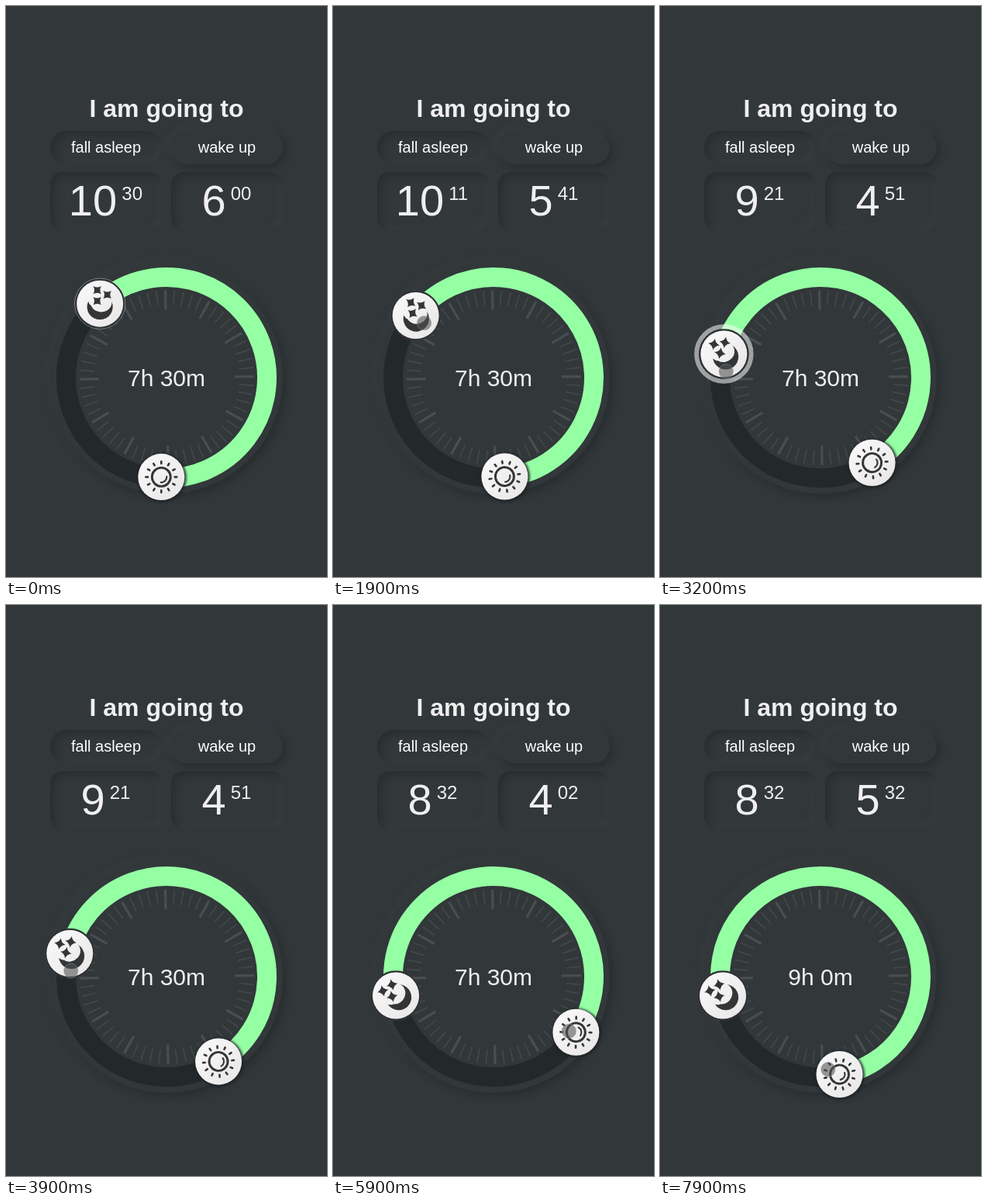
Recreate the animation shown at these times as an HTML page. Size 414 by 736 pixels, loop 8000 ms.

```html
<!DOCTYPE html>
<html lang="en">
<head>
<meta charset="utf-8">
<title>Sleep timer</title>
<style>
html, body { margin: 0; width: 100%; height: 100%; overflow: hidden; background: #32373a; }
#stage {
  position: relative; width: 414px; height: 736px; overflow: hidden;
  background: #32373a;
  font-family: "Liberation Sans", Arial, sans-serif;
}
.box { position: absolute; width: 144px; }
.left { left: 57px; }
.right { left: 213px; }
.button { top: 161px; height: 43px; border-radius: 21px; }
.time { top: 214px; height: 75px; border-radius: 16px; }
.inset { box-shadow: inset 5px 5px 9px #292e31, inset -5px -5px 9px #373c3f; }
.raised { box-shadow: 4px 4px 8px #282d30, -4px -4px 8px #383d40; }
.bezel {
  position: absolute; left: 57px; top: 329px; width: 300px; height: 300px;
  border-radius: 50%; box-shadow: 5px 5px 10px #292e31, -4px -4px 9px #373c3f;
}
svg { position: absolute; left: 0; top: 0; }
text { fill: #efefef; text-anchor: middle; }
.title { font-size: 32px; font-weight: bold; }
.label { font-size: 20px; fill: #fff; }
.hour { font-size: 56px; text-anchor: start; }
.minute { font-size: 24px; text-anchor: start; }
.total { font-size: 30px; }
.ink { fill: #333537; }
.line { fill: none; stroke: #333537; stroke-linecap: round; }
</style>
</head>
<body>
<div id="stage">
  <div class="box button left inset"></div>
  <div class="box button right raised"></div>
  <div class="box time left inset"></div>
  <div class="box time right inset"></div>
  <div class="bezel"></div>
  <svg width="414" height="736" viewBox="0 0 414 736">
    <defs>
      <linearGradient id="face" x1="0" y1="0" x2="1" y2="1">
        <stop offset="0" stop-color="#fbfafa"/>
        <stop offset="1" stop-color="#e7e5e5"/>
      </linearGradient>
      <filter id="shade" x="-30%" y="-30%" width="160%" height="160%">
        <feGaussianBlur stdDeviation="1.5"/>
      </filter>
    </defs>
    <text class="title" x="207" y="143">I am going to</text>
    <text class="label" x="129" y="189">fall asleep</text>
    <text class="label" x="285" y="189">wake up</text>
    <text class="hour" id="sleepHour" y="270"></text>
    <text class="minute" id="sleepMinute" y="250"></text>
    <text class="hour" id="wakeHour" y="270"></text>
    <text class="minute" id="wakeMinute" y="250"></text>

    <circle cx="207" cy="479" r="129.5" fill="none" stroke="#23282b" stroke-width="25"/>
    <g id="ticks" transform="translate(207.3 479.3) rotate(-0.9)"></g>
    <path id="arc" fill="none" stroke-width="25"/>
    <text class="total" id="total" x="207" y="490"></text>

    <g id="sun">
      <circle cx=".8" cy=".8" r="31.8" fill="#1c2022" opacity=".85" filter="url(#shade)"/>
      <circle r="30" fill="url(#face)"/>
      <g id="sunIcon">
        <circle class="line" r="12" stroke-width="2.9"/>
        <path class="line" d="M7 -.5A7 7 0 0 1 -.5 7" stroke-width="2.1"/>
      </g>
    </g>
    <g id="moon">
      <circle id="pulse" fill="none" stroke="#fff"/>
      <circle r="31" fill="none" stroke="#2d3133" stroke-width="2.4"/>
      <circle r="30" fill="url(#face)"/>
      <g id="moonIcon">
        <path class="ink" d="M-15 -3A16.6 16.6 0 1 0 15 -3A13.5 12 0 0 1 -11 3Q-14 1 -15 -3Z"/>
      </g>
    </g>
    <circle id="cursor" r="9.3" fill="#505152" fill-opacity=".58" stroke="#aaa" stroke-opacity=".4"/>
  </svg>
</div>
<script>
const LOOP = 8000, CX = 207, CY = 479, KNOB_R = 128.3, ARC_R = 129.5, CYCLE = 90;
const $ = id => document.getElementById(id);

const clamp = x => Math.min(1, Math.max(0, x));
const mix = (a, b, p) => a + (b - a) * p;
const ramp = (t, t0, t1) => clamp((t - t0) / (t1 - t0));
const glide = (t, t0, t1) => .5 - .5 * Math.cos(Math.PI * ramp(t, t0, t1));

// Times of day in minutes on a twelve-hour dial
const sleepAt = t => 630 - 160 * glide(t, 1700, 2600)
  + 132 * glide(t, 2700, 3500) - 90 * glide(t, 3500, 4350);
const wakeAt = t => sleepAt(t) - 270 - 47 * glide(t, 5900, 6400)
  + 47 * glide(t, 6400, 6720) + 90 * glide(t, 7050, 7600);
const spanAt = t => Math.round(wakeAt(t)) + 720 - Math.round(sleepAt(t));
const dialAngle = minutes => minutes / 2 + 3;

// Share of the last 300 ms spent away from a whole sleep cycle
function warnAt(t) {
  const steps = 30;
  let off = 0;
  for (let i = 0; i < steps; i++) {
    const span = spanAt(t - i * 300 / steps);
    if (Math.abs(span - CYCLE * Math.round(span / CYCLE)) > 3) off++;
  }
  return off / steps;
}

function polar(deg, r) {
  const a = deg * Math.PI / 180;
  return [CX + r * Math.sin(a), CY - r * Math.cos(a)];
}

// The pointer drags the moon, swings across the dial, then drags the sun
function cursorAt(t) {
  const moonLag = 1.3 - 11.3 * glide(t, 1700, 2500);
  const moonR = 46 + 67.5 * glide(t, 800, 1150) + 10 * glide(t, 1700, 3700);
  const sunLead = 1.8 + 4.5 * glide(t, 7050, 7600);
  const a = polar(dialAngle(sleepAt(t)) + moonLag, moonR);
  const b = polar(dialAngle(wakeAt(t)) + sunLead, 120);
  const p = glide(t, 4600, 5220);
  return [mix(a[0], b[0], p), mix(a[1], b[1], p) + 50 * Math.sin(Math.PI * p)];
}

function set(el, attrs) {
  for (const key in attrs) el.setAttribute(key, attrs[key]);
}

function add(parent, tag, attrs) {
  const el = document.createElementNS("http://www.w3.org/2000/svg", tag);
  set(el, attrs);
  parent.append(el);
}

for (let i = 0; i < 60; i++) {
  const major = i % 5 === 0;
  add($("ticks"), "line", {
    y1: major ? -87.5 : -94, y2: -112.5,
    stroke: major ? "#484e51" : "#42484b",
    "stroke-width": major ? 3.2 : 1.7,
    transform: `rotate(${i * 6})`
  });
}
for (let i = 0; i < 12; i++) {
  add($("sunIcon"), "line", {
    class: "line", y1: -17.3, y2: -20, "stroke-width": 2.6, transform: `rotate(${i * 30})`
  });
}
for (const [x, y] of [[-3.5, -17.5], [9.5, -11.5], [-3.5, -3.5]]) {
  add($("moonIcon"), "path", {
    class: "ink", transform: `translate(${x} ${y})`,
    d: "M-5.2 -5.2Q0 -2.2 5.2 -5.2Q2.2 0 5.2 5.2Q0 2.2 -5.2 5.2Q-2.2 0 -5.2 -5.2Z"
  });
}

function showTime(name, minutes, center) {
  const m = Math.round(minutes);
  const hour = String(Math.floor(m / 60)), width = hour.length * 31.14;
  const x = center - (width + 31.7) / 2;
  $(name + "Hour").textContent = hour;
  $(name + "Minute").textContent = String(m % 60).padStart(2, "0");
  set($(name + "Hour"), { x: x - 1.2 });
  set($(name + "Minute"), { x: x + width + 5 });
}

function place(name, angle, base) {
  const [x, y] = polar(angle, KNOB_R);
  set($(name), { transform: `translate(${x} ${y})` });
  set($(name + "Icon"), { transform: `rotate(${angle - base})` });
}

function draw(t) {
  const sleep = sleepAt(t), wake = wakeAt(t), span = spanAt(t);
  showTime("sleep", sleep, 129);
  showTime("wake", wake, 285);
  $("total").textContent = `${Math.floor(span / 60)}h ${span % 60}m`;

  const from = dialAngle(sleep), to = dialAngle(wake);
  place("moon", from, 318);
  place("sun", to, 183);

  const large = to + 360 - from > 180 ? 1 : 0;
  const warn = warnAt(t);
  const color = [[149, 255], [255, 140], [164, 134]].map(([a, b]) => Math.round(mix(a, b, warn)));
  set($("arc"), {
    d: `M${polar(from, ARC_R)}A${ARC_R} ${ARC_R} 0 ${large} 1 ${polar(to, ARC_R)}`,
    stroke: `rgb(${color})`
  });

  const phase = t % 2000 / 2000;
  const size = .6 + 9 * (phase < .85 ? phase : 0);
  set($("pulse"), {
    r: 32.2 + size / 2, "stroke-width": size,
    "stroke-opacity": Math.min(.82, 1 - phase ** 1.5)
  });

  const [cx, cy] = cursorAt(t);
  set($("cursor"), { cx, cy, opacity: ramp(t, 800, 950) });
}

const start = performance.now();
function frame() {
  draw((performance.now() - start) % LOOP);
  requestAnimationFrame(frame);
}
draw(0);
requestAnimationFrame(frame);
</script>
</body>
</html>
```
